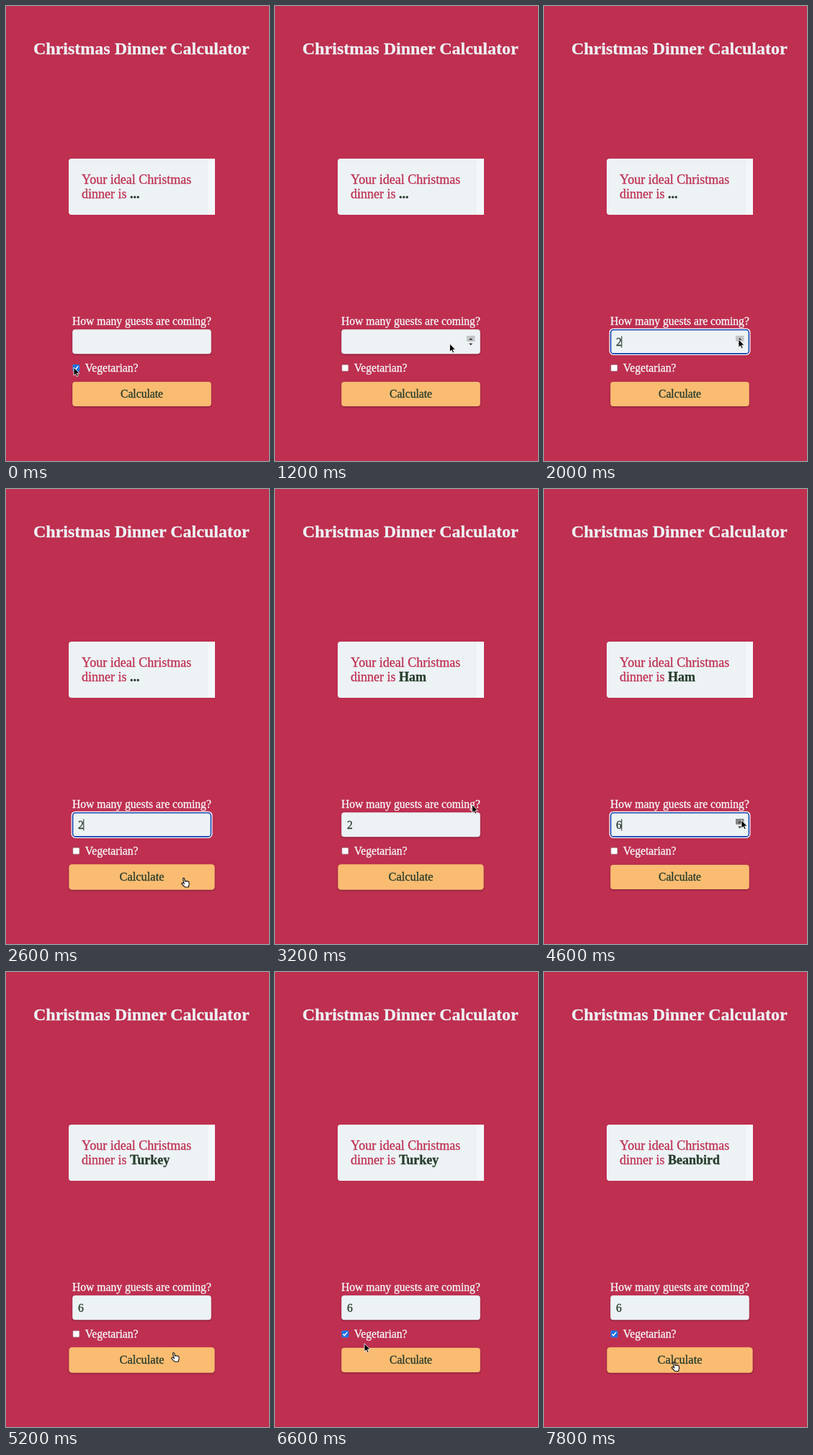
Animation, 365 px wide and 632 px high, one loop 8000 ms. Source, as an HTML page:

```html
<!DOCTYPE html>
<html lang="en">
<head>
<meta charset="utf-8">
<title>Christmas Dinner Calculator</title>
<style>
  html, body { margin: 0; width: 100%; height: 100%; overflow: hidden; background: #be2f50; }
  svg { display: block; width: 100%; height: 100%; }
  text {
    font: 15.65px "Liberation Serif", "Times New Roman", serif;
    fill: #f6f8fa; stroke: #f6f8fa; stroke-width: .3px;
  }
  .title { font-size: 24px; font-weight: bold; fill: #edf2f4; stroke: #edf2f4; }
  .answer { font-size: 18px; fill: #be2f50; stroke: #be2f50; }
  .answer tspan { font-weight: bold; }
  .answer tspan, .dark { fill: #263c2c; stroke: #263c2c; }
  .field, .button rect { filter: drop-shadow(0 1px 1px #0005); }
  .button { transform-origin: 188.5px 539px; }
  .button.hover { transform: scale(1.05); }
</style>
</head>
<body>
<svg viewBox="0 0 365 632">
  <rect width="365" height="632" fill="#be2f50"/>
  <text class="title" x="38" y="67.3">Christmas Dinner Calculator</text>

  <path d="M290 212H91q-4 0-4 4v70q0 4 4 4h199z" fill="#edf2f5"/>
  <path d="M279 212h11v78h-11z" fill="#f4f7fa"/>
  <path d="M278.7 212v78" stroke="#e5eaee" stroke-width=".8"/>
  <text class="answer" x="105" y="246.5">Your ideal Christmas</text>
  <text class="answer" x="105" y="267">dinner is <tspan id="dish">...</tspan></text>

  <text x="92" y="443">How many guests are coming?</text>
  <rect class="field" x="92.2" y="449.3" width="192.6" height="34" rx="4" fill="#edf2f5"/>
  <g id="focus">
    <rect x="91.2" y="448.4" width="194.6" height="35.9" rx="5" fill="none" stroke="#fff" stroke-width="1.4"/>
    <rect x="92.6" y="449.8" width="191.8" height="33.1" rx="4" fill="none" stroke="#1647b5" stroke-width="1.6"/>
    <path d="M107.8 458.5v16" stroke="#222"/>
  </g>
  <g id="spinner">
    <path id="up" d="M266 458h11.5v8H266z"/>
    <path d="M269 464l2.7-3 2.7 3zM269 468.5l2.7 3 2.7-3z" fill="#444"/>
  </g>
  <text id="count" class="dark" x="100" y="471.5"></text>

  <rect x="92.9" y="498.2" width="9" height="9" rx="1" fill="#fff" stroke="#8a7079" stroke-width=".6"/>
  <g id="tick">
    <rect x="92.6" y="497.9" width="9.6" height="9.6" rx="1.5" fill="#1a70e6"/>
    <path d="M94.5 502.9l2 2 3.8-4.8" fill="none" stroke="#fff" stroke-width="1.5"/>
  </g>
  <text x="109.7" y="507.5">Vegetarian?</text>

  <g id="button" class="button">
    <rect x="92.2" y="522.1" width="192.6" height="33.8" rx="4" fill="#fabc71"/>
    <text class="dark" x="188.5" y="543.6" text-anchor="middle">Calculate</text>
  </g>

  <path id="arrow" d="M0 0V11.3L2.6 8.9 4.3 12.8 6.2 12 4.5 8.2H8z" fill="#000" stroke="#fff" stroke-width=".8"/>
  <path id="hand" d="M1.2 8.2L-.4 1.8Q-.6.5.4.4 1.4.3 1.7 1.5L2.6 5Q3.5 4.2 4.3 5 5.3 4.3 6 5.2 7.2 4.6 7.8 6 8.8 9 7.6 11L7.3 13H2.4Q1 11.4-1.8 9-3 7.6-1.6 7.2-.2 7 1.2 8.2z" fill="#fff" stroke="#111" stroke-width="1.1"/>
</svg>
<script>
  const LOOP = 8000, STEP = 200;
  const $ = id => document.getElementById(id);

  // Pointer path: time, x, y
  const path = [
    [0, 94, 502], [600, 94, 502], [1400, 270, 463], [2000, 270, 463],
    [2400, 246, 540], [2800, 246, 540], [3200, 273.5, 438.5], [3600, 274, 460],
    [4600, 274, 460], [4800, 232, 530], [5200, 232, 528.3], [5400, 228, 530],
    [6000, 97, 502], [6400, 97, 502], [6600, 124, 516], [7200, 179.5, 541.5], [8000, 179.5, 541.5]
  ];
  const counts = [[0, ''], [1600, '1'], [1800, '2'], [3800, '3'], [4200, '4'], [4400, '5'], [4600, '6']];
  const dishes = [[0, '...'], [2800, 'Ham'], [5000, 'Turkey'], [7400, 'Beanbird']];

  const latest = (list, t) => list.filter(([start]) => start <= t).pop()[1];
  const within = (t, ...spans) => spans.some(([a, b]) => t >= a && t < b);
  const show = (id, on) => $(id).style.display = on ? '' : 'none';

  function pointerAt(t) {
    const i = path.findIndex(([end]) => end > t);
    const [t0, x0, y0] = path[i - 1], [t1, x1, y1] = path[i];
    const u = (t - t0) / (t1 - t0), k = u * u * (3 - 2 * u);
    return [x0 + (x1 - x0) * k, y0 + (y1 - y0) * k];
  }

  function draw(t) {
    const [x, y] = pointerAt(t);
    const onButton = x > 88 && x < 290 && y > 521 && y < 557;
    const onField = x > 92 && x < 285 && y > 449 && y < 484;
    const pressed = within(t, [1600, 2000], [3800, 4800]);

    $('dish').textContent = latest(dishes, t);
    $('count').textContent = latest(counts, t);
    show('focus', within(t, [1600, 2800], [3800, 5000]));
    show('spinner', onField);
    $('up').setAttribute('fill', pressed ? '#858688' : '#c3c5c7');
    show('tick', within(t, [0, 400], [6200, LOOP]));
    $('button').classList.toggle('hover', onButton || within(t, [3000, 3400]));

    for (const id of ['arrow', 'hand']) $(id).setAttribute('transform', `translate(${x} ${y})`);
    show('arrow', !onButton);
    show('hand', onButton);
  }

  const start = performance.now();
  function tick() {
    const t = (performance.now() - start) % LOOP;
    draw(Math.floor(t / STEP) * STEP);
    requestAnimationFrame(tick);
  }
  tick();
</script>
</body>
</html>
```
